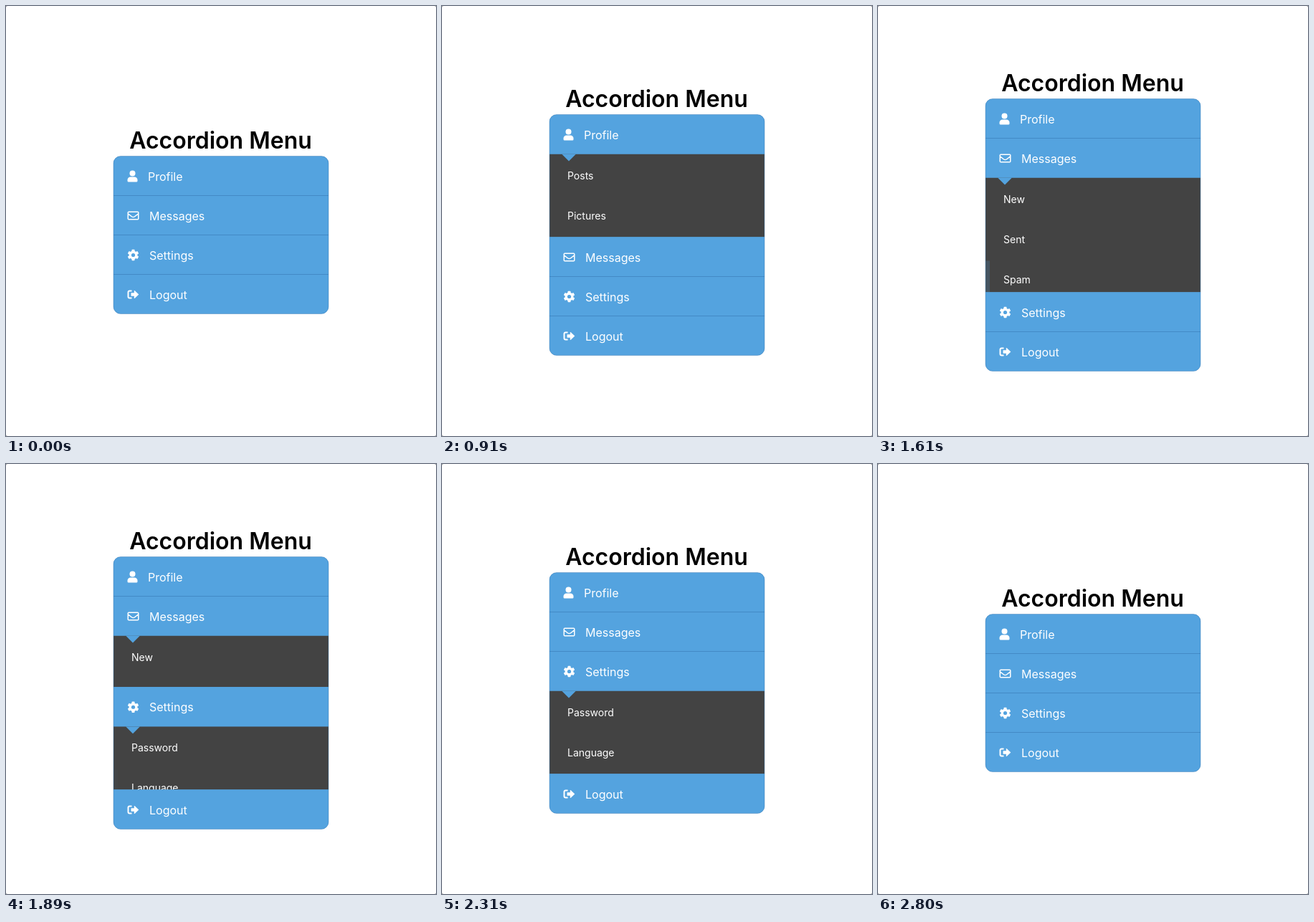
Write an HTML page with a canvas that moves like this. It is 600 by 600 pixels and loops after 3150 ms.

```html
<!DOCTYPE html>
<html lang="en">
<head>
<meta charset="utf-8">
<title>Accordion Menu</title>
<style>
  html, body { margin: 0; width: 100%; height: 100%; overflow: hidden; background: #fff; }
  canvas { display: block; width: 600px; height: 600px; }
</style>
</head>
<body>
<canvas id="stage" width="600" height="600"></canvas>
<script>
const g = document.getElementById('stage').getContext('2d');
const LOOP = 3150, STEP = 70, FADE = 300;
const BLUE = '#54a3df', DARK = '#434343';
const FONT = 'Inter, "Noto Sans", sans-serif';
const LEFT = 150, WIDTH = 300, ROW = 55, MAX = 160;

// open / close: times at which a panel starts to move
const menu = [
  { label: 'Profile', icon: user, iconW: 14, open: 493.6, close: 1089.8, items: [
    { label: 'Posts', enter: 600, leave: 690 },
    { label: 'Pictures', enter: 690, leave: 770 }] },
  { label: 'Messages', icon: envelope, iconW: 16, open: 1089.8, close: 1794, items: [
    { label: 'New', enter: 1165, leave: 1230 },
    { label: 'Sent', enter: 1230, leave: 1310 },
    { label: 'Spam', enter: 1310, leave: 1485 }] },
  { label: 'Settings', icon: cog, iconW: 16, open: 1794, close: 2474.1, items: [
    { label: 'Password' },
    { label: 'Language', enter: 1880, leave: 1965 }] },
  { label: 'Logout', icon: exit, iconW: 16, items: [] }
];

// cubic-bezier(.25, .1, .25, 1)
function ease(x) {
  if (x <= 0) return 0;
  if (x >= 1) return 1;
  let lo = 0, hi = 1;
  for (let i = 0; i < 30; i++) {
    const u = (lo + hi) / 2;
    if (0.75 * u * (1 - u) + u ** 3 < x) lo = u; else hi = u;
  }
  const u = lo, v = 1 - u;
  return 0.3 * u * v * v + 3 * u * u * v + u ** 3;
}

function panelHeight(m, t) {
  if (!m.items.length) return 0;
  const limit = MAX * (ease((t - m.open) / FADE) - ease((t - m.close) / FADE));
  return Math.max(0, Math.min(limit, 4 + 56 * m.items.length));
}

function hoverAlpha(item, t) {
  if (!item.enter || t <= item.enter) return 0;
  const peak = ease((Math.min(t, item.leave) - item.enter) / FADE);
  return t < item.leave ? peak : peak * (1 - ease((t - item.leave) / (FADE * peak)));
}

function rect(color, x, y, w, h) {
  g.fillStyle = color;
  g.fillRect(x, y, w, h);
}

function disc(x, y, r) {
  g.beginPath();
  g.arc(x, y, r, 0, Math.PI * 2);
  g.fill();
}

function poly(...p) {
  g.beginPath();
  for (let i = 0; i < p.length; i += 2) g.lineTo(p[i], p[i + 1]);
  g.closePath();
  g.fill();
}

function text(str, x, y, size, color = '#fff', weight = 400, align = 'left') {
  g.font = `${weight} ${size}px ${FONT}`;
  g.textAlign = align;
  g.fillStyle = color;
  g.fillText(str, x, y);
}

function user() {
  disc(7, 4, 4);
  g.beginPath();
  g.roundRect(0, 9, 14, 7, [4.2, 4.2, 1.5, 1.5]);
  g.fill();
}

function envelope() {
  g.lineWidth = 1.5;
  g.beginPath();
  g.roundRect(0.75, 2.75, 14.5, 10.5, 1);
  g.moveTo(0.8, 5.4);
  g.lineTo(6.2, 9.5);
  g.quadraticCurveTo(8, 10.7, 9.8, 9.5);
  g.lineTo(15.2, 5.4);
  g.stroke();
}

function cog() {
  g.translate(8, 8);
  disc(0, 0, 5.9);
  for (let i = 0; i < 6; i++) {
    g.beginPath();
    g.roundRect(-2, -7.8, 4, 5, 0.7);
    g.fill();
    g.rotate(Math.PI / 3);
  }
  g.fillStyle = BLUE;
  disc(0, 0, 2.6);
}

function exit() {
  g.lineWidth = 2;
  g.beginPath();
  g.moveTo(6, 3);
  g.lineTo(3, 3);
  g.quadraticCurveTo(1, 3, 1, 5);
  g.lineTo(1, 11);
  g.quadraticCurveTo(1, 13, 3, 13);
  g.lineTo(6, 13);
  g.stroke();
  poly(5, 5.7, 9.3, 5.7, 9.3, 2.7, 10, 2.5, 15.8, 8, 10, 13.5, 9.3, 13.3, 9.3, 10.3, 5, 10.3);
}

function header(m, y) {
  rect(BLUE, LEFT, y, WIDTH, ROW);
  g.save();
  g.translate(169.5, y + 20);
  g.fillStyle = g.strokeStyle = '#fff';
  m.icon();
  g.restore();
  text(m.label, 184 + m.iconW, y + 34, 16);
}

function panel(m, y, h, t) {
  g.save();
  g.beginPath();
  g.rect(LEFT, y, WIDTH, h);
  g.clip();
  rect(DARK, LEFT, y, WIDTH, h);
  m.items.forEach((item, i) => {
    const top = y + 4 + 56 * i;
    g.globalAlpha = hoverAlpha(item, t);
    rect(BLUE, LEFT, top, 6, 52);
    g.globalAlpha = 1;
    text(item.label, 175, top + 31, 14);
  });
  g.fillStyle = BLUE;
  poly(167, y, 187, y, 177, y + 10);
  g.restore();
}

// hairline between touching rows, strongest on half pixels
function seam(y) {
  const f = y - Math.floor(y);
  rect(`rgba(40,100,160,${1.6 * f * (1 - f)})`, LEFT, Math.floor(y), WIDTH, 1);
}

function box(top, height) {
  g.beginPath();
  g.roundRect(LEFT, top, WIDTH, height, 10);
}

function draw(t) {
  const heights = menu.map(m => panelHeight(m, t));
  const total = ROW * menu.length + heights.reduce((a, b) => a + b);
  const top = 319.5 - total / 2;

  rect('#999', 0, 0, 600, 600);
  g.fillStyle = '#fff';
  g.beginPath();
  g.roundRect(0, 0, 600, 600, 2.5);
  g.fill();

  text('Accordion Menu', 299.5, top - 11, 32, '#000', 600, 'center');

  g.save();
  box(top, total);
  g.clip();
  rect(BLUE, LEFT, top, WIDTH, total);
  let y = top;
  menu.forEach((m, i) => {
    header(m, y);
    if (i && heights[i - 1] < 0.5) seam(y);
    y += ROW;
    if (heights[i] > 0) panel(m, y, heights[i], t);
    y += heights[i];
  });
  g.restore();

  g.lineWidth = 1;
  g.strokeStyle = 'rgba(50,115,175,.45)';
  box(top, total);
  g.stroke();
}

function tick() {
  const t = performance.now() % LOOP;
  draw(Math.floor(t / STEP) * STEP);
  requestAnimationFrame(tick);
}
tick();
</script>
</body>
</html>
```
